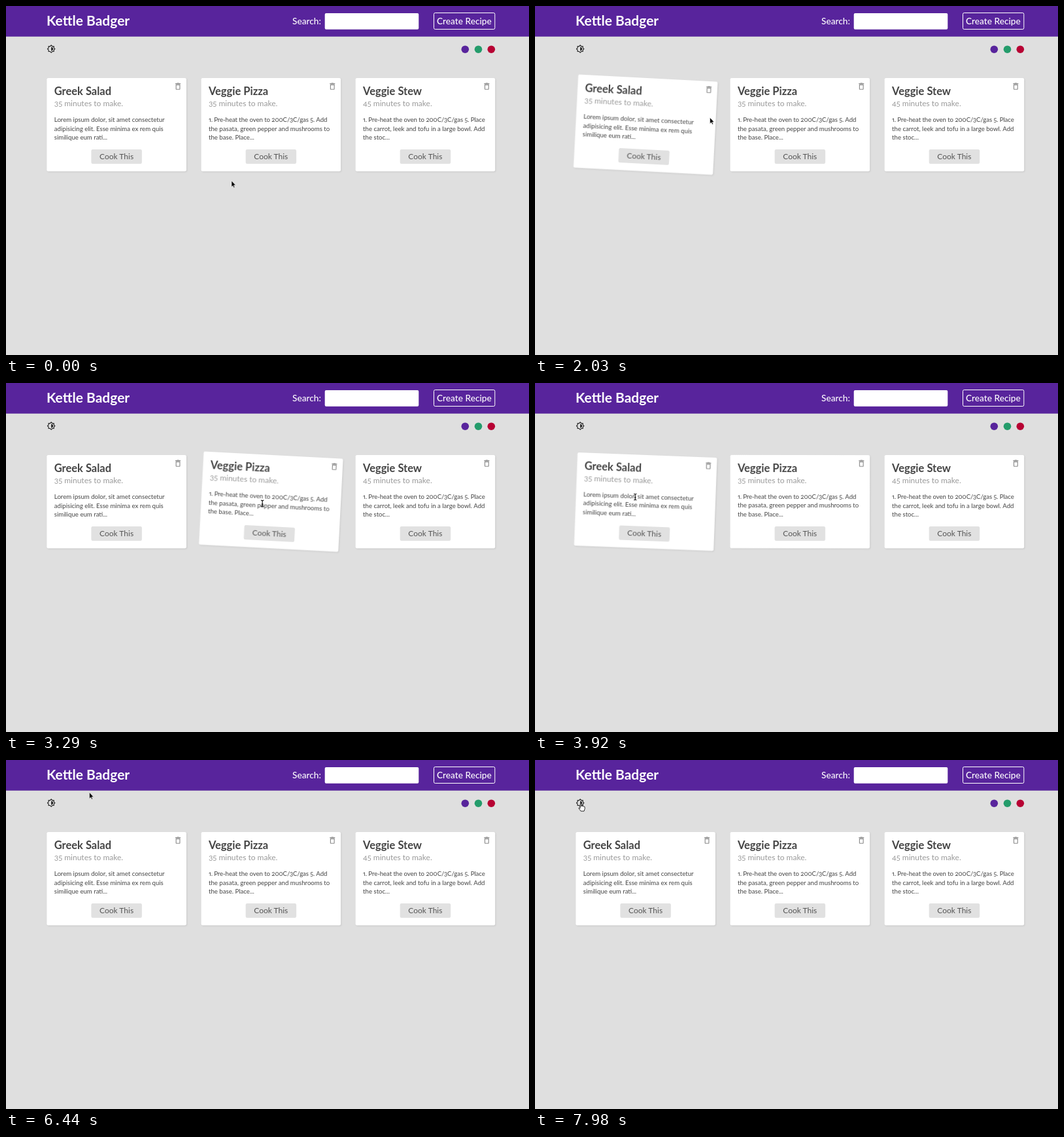
An HTML page for the animation above (8000 ms loop, 800 by 533 pixels).

```html
<!DOCTYPE html>
<html lang="en">
<head>
<meta charset="utf-8">
<title>Recipes</title>
<style>
  html, body { margin: 0; height: 100%; overflow: hidden; background: #dfdfdf; }
  svg { display: block; width: 100vw; height: 100vh; font-family: Lato, "Open Sans", sans-serif; font-variant-numeric: oldstyle-nums proportional-nums; }
  .bar { font-size: 13.7px; font-weight: 500; fill: #fff; }
  .logo { font-size: 21px; font-weight: 700; fill: #fff; }
  .card { filter: drop-shadow(1px 1.5px 1.2px rgba(0, 0, 0, .1)); }
  .title { font-size: 16.5px; font-weight: 700; fill: #444; }
  .time { font-size: 12px; fill: #999; }
  .body { font-size: 9.65px; fill: #444; }
  .tight { letter-spacing: -.07px; }
  .cook { font-size: 12px; fill: #555; text-anchor: middle; }
</style>
</head>
<body>
<svg viewBox="0 0 800 533">
  <rect width="800" height="46.7" fill="#58249c"/>
  <text class="logo" x="62" y="30">Kettle Badger</text>
  <text class="bar" x="438" y="27.7">Search:</text>
  <rect x="487.7" y="11" width="143.6" height="24.7" rx="2" fill="#fff"/>
  <rect x="654.5" y="10.5" width="93.3" height="25" rx="2" fill="none" stroke="#fff"/>
  <text class="bar" x="659" y="27.7">Create Recipe</text>

  <path transform="translate(62.3 58.7) scale(.571)" fill="#222" d="M20 8.69V4h-4.69L12 .69 8.69 4H4v4.69L.69 12 4 15.31V20h4.69L12 23.31 15.31 20H20v-4.69L23.31 12zM18 14.48V18h-3.52L12 20.48 9.52 18H6v-3.52L3.52 12 6 9.52V6h3.52L12 3.52 14.48 6H18v3.52L20.48 12zM12 7v10a5 5 0 0 0 0-10z" fill-rule="evenodd"/>
  <circle cx="702.3" cy="66.2" r="5.8" fill="#58249c"/>
  <circle cx="722.5" cy="66.2" r="5.8" fill="#249c6b"/>
  <circle cx="742.3" cy="66.2" r="5.8" fill="#b70233"/>

  <g id="cards"></g>

  <g id="pointer">
    <path id="arrow" d="M0 0V9.3L2.1 7.4 3.5 10.5 4.9 9.9 3.5 6.8H6.3z" fill="#000" stroke="#fff" stroke-width=".5"/>
    <path id="beam" d="M-2.2-4.8Q0-4.8 0-3.4Q0-4.8 2.2-4.8M0-3.4V3.4M-2.2 4.8Q0 4.8 0 3.4Q0 4.8 2.2 4.8M-1.2.9H1.2" fill="none" stroke="#111" stroke-width="1.1"/>
    <path id="hand" d="M-.9.8Q0-.6.9.8V4.3Q2-.0 2.8 4.3Q4 3 4.6 4.8Q6.2 4 6.2 5.8V8L5 11.6H.2L-3 7.4Q-3.5 5.6-.9 7.2z" fill="#fff" stroke="#111" stroke-width=".9" stroke-linejoin="round"/>
  </g>
</svg>
<script>
const LOOP = 8000, STEP = 70, TURN = 300, TILT = 3;
const CARD = { top: 110, width: 213.5, height: 142.5 };
const byId = id => document.getElementById(id);

// hover: [enter, leave] times in ms
const cards = [
  { x: 62.4, title: 'Greek Salad', mins: 35, hover: [[1303, 2060], [3790, 4770]],
    lines: ['Lorem ipsum dolor, sit amet consectetur', 'adipisicing elit. Esse minima ex rem quis', 'similique eum rati...'] },
  { x: 298.6, title: 'Veggie Pizza', mins: 35, hover: [[450, 1288], [2110, 3680]],
    lines: ['1. Pre-heat the oven to 200C/3C/gas 5. Add', 'the pasata, green pepper and mushrooms to', 'the base. Place...'] },
  { x: 534.7, title: 'Veggie Stew', mins: 45, hover: [],
    lines: ['1. Pre-heat the oven to 200C/3C/gas 5. Place', 'the carrot, leek and tofu in a large bowl. Add', 'the stoc...'] }
];

byId('cards').innerHTML = cards.map(c => `
  <g class="card">
    <rect x="${c.x}" y="${CARD.top}" width="${CARD.width}" height="${CARD.height}" rx="2.3" fill="#fff"/>
    <text class="title" x="${c.x + 11.3}" y="135.6">${c.title}</text>
    <text class="time" x="${c.x + 11.4}" y="153.2">${c.mins} minutes to make.</text>
    ${c.lines.map((line, i) => `<text class="body ${/\d/.test(line) ? 'tight' : ''}" x="${c.x + 11.4}" y="${176.8 + i * 13.7}">${line}</text>`).join('')}
    <rect x="${c.x + 68}" y="219" width="77.5" height="22" rx="2.3" fill="#e1e1e1"/>
    <text class="cook" x="${c.x + 106.7}" y="234.4">Cook This</text>
    <path transform="translate(${c.x + 193.8} 115.8) scale(.571)" fill="#8a8a8a" fill-rule="evenodd" d="M6 19c0 1.1.9 2 2 2h8c1.1 0 2-.9 2-2V7H6zM8 9h8v10H8zM15.5 4l-1-1h-5l-1 1H5v2h14V4z"/>
  </g>`).join('');
const groups = [...document.querySelectorAll('.card')];

// pointer path: time, x, y
const path = [
  [0, 345, 267], [350, 345, 267], [700, 375, 205], [1190, 395, 150], [1295, 288, 124],
  [1400, 246.7, 111.5], [1750, 215, 150], [2060, 276, 172], [2110, 299, 174], [2520, 466.5, 180],
  [2870, 460, 186], [3680, 298, 180], [3790, 276, 178], [3920, 153.3, 174], [4340, 118, 160],
  [4770, 121, 110], [4970, 122.6, 85.2], [5700, 140, 66], [6440, 127.6, 49.6], [7200, 72, 64],
  [7600, 70, 66.5], [8000, 70, 66.5]
];

// Monotone cubic through the path points
function along(t, axis) {
  const slope = i => (path[i + 1][axis] - path[i][axis]) / (path[i + 1][0] - path[i][0]);
  const tangent = i => {
    if (i === 0 || i === path.length - 1) return 0;
    const a = slope(i - 1), b = slope(i);
    return a * b > 0 ? 2 * a * b / (a + b) : 0;
  };
  const i = path.findIndex((p, k) => t < path[k + 1][0]);
  const span = path[i + 1][0] - path[i][0], u = (t - path[i][0]) / span, v = 1 - u;
  return path[i][axis] * v * v * (1 + 2 * u) + path[i + 1][axis] * u * u * (1 + 2 * v)
    + span * u * v * (v * tangent(i) - u * tangent(i + 1));
}

// Same curve as the CSS "ease" keyword
function ease(x) {
  if (x <= 0) return 0;
  if (x >= 1) return 1;
  const bezier = (s, a, b) => 3 * s * (1 - s) * ((1 - s) * a + s * b) + s ** 3;
  let lo = 0, hi = 1;
  for (let i = 0; i < 20; i++) {
    const mid = (lo + hi) / 2;
    if (bezier(mid, .25, .25) < x) lo = mid; else hi = mid;
  }
  return bezier(lo, .1, 1);
}

function pointerShape(x, y) {
  if (x > 62 && x < 76 && y > 58 && y < 73) return 'hand';
  const onText = cards.some(c => x > c.x + 11 && x < c.x + 202 && y > 120 && y < 208);
  return onText ? 'beam' : 'arrow';
}

function draw(now) {
  const t = Math.floor(now % LOOP / STEP) * STEP;
  cards.forEach((c, i) => {
    const angle = TILT * c.hover.reduce((sum, [enter, leave]) =>
      sum + ease((t - enter) / TURN) - ease((t - leave) / TURN), 0);
    groups[i].setAttribute('transform',
      `rotate(${angle} ${c.x + CARD.width / 2} ${CARD.top + CARD.height / 2})`);
  });
  const x = along(t, 1), y = along(t, 2), shape = pointerShape(x, y);
  byId('pointer').setAttribute('transform', `translate(${x} ${y})`);
  for (const id of ['arrow', 'beam', 'hand']) byId(id).style.display = id === shape ? '' : 'none';
}

const start = performance.now();
function tick() {
  draw(performance.now() - start);
  requestAnimationFrame(tick);
}
tick();
</script>
</body>
</html>
```
